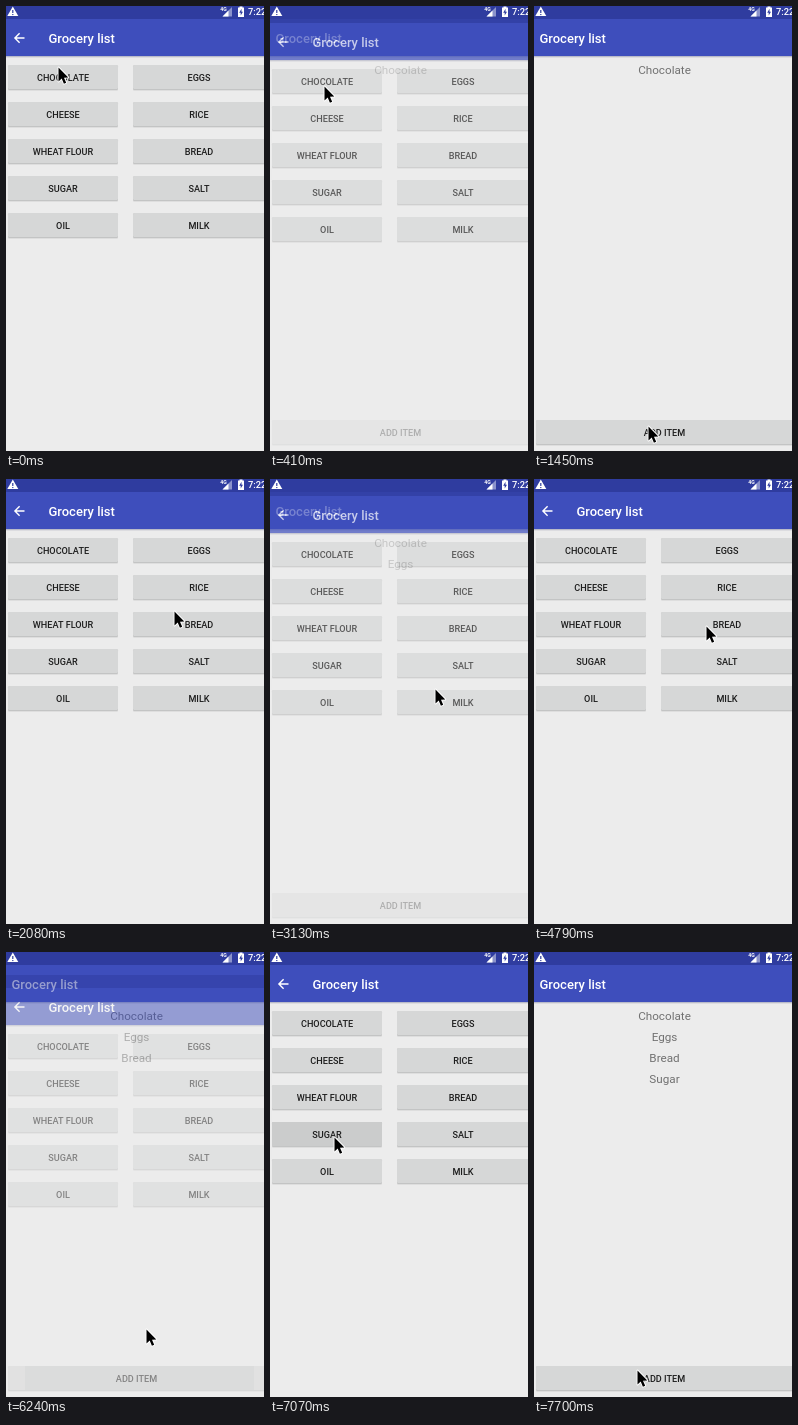
An HTML page with a canvas for the animation above (8 s loop, 258x445 px).

```html
<!DOCTYPE html>
<html lang="en">
<head>
<meta charset="utf-8">
<title>Grocery list</title>
<style>
html, body { margin: 0; width: 258px; height: 445px; overflow: hidden; background: #ececec; }
canvas { display: block; }
</style>
</head>
<body>
<canvas id="stage" width="258" height="445"></canvas>
<script>
const W = 258, H = 445, LOOP = 8000, TICK = 208.3;
const stage = document.getElementById('stage').getContext('2d');
const layer = document.createElement('canvas');
layer.width = W;
layer.height = H;
const layerCtx = layer.getContext('2d');

const goods = [
  ['CHOCOLATE', 'EGGS'], ['CHEESE', 'RICE'], ['WHEAT FLOUR', 'BREAD'],
  ['SUGAR', 'SALT'], ['OIL', 'MILK']
];
const bought = ['Chocolate', 'Eggs', 'Bread', 'Sugar'];

// Each scene starts at a tick and lasts until the next one.
const scenes = [
  { at: 0, pick: 1 },
  { at: 1, pick: 1, press: 'CHOCOLATE' },
  { at: 2, items: 1, pick: 0.7, shift: 4 },
  { at: 3, items: 1 },
  { at: 9, items: 1, pick: 0.5, shift: 23, ripple: [19, 248] },
  { at: 10, pick: 1 },
  { at: 15, items: 2, pick: 0.7, shift: 4 },
  { at: 16, items: 2 },
  { at: 19, items: 2, ripple: [21, 239] },
  { at: 20, pick: 1 },
  { at: 25, pick: 1, press: 'BREAD' },
  { at: 26, items: 3 },
  { at: 30, items: 3, pick: 0.5, shift: 23, ripple: [19, 248] },
  { at: 31, pick: 1 },
  { at: 34, pick: 1, press: 'SUGAR' },
  { at: 35, items: 4 }
];

// Pointer waypoints: tick, x, y
const path = [
  [0, 52, 61], [2, 54, 80], [6, 113, 428], [7, 114, 420], [8, 114, 420],
  [9, 138, 340], [10, 168, 132], [13, 182, 63], [14, 182, 63], [15, 165, 210],
  [16, 128, 425], [18, 128, 425], [19, 140, 345], [20, 165, 200],
  [23, 172, 147], [24, 172, 147], [25, 168, 190], [27, 130, 420],
  [29, 128, 421], [30, 140, 377], [31, 95, 240], [32, 62, 176],
  [33, 62, 176], [34, 64, 185], [35, 78, 270], [37, 103, 418], [39, 103, 418]
];

function text(c, str, x, y, size, weight, color, align = 'left') {
  c.font = `${weight} ${size}px Roboto, sans-serif`;
  c.textAlign = align;
  c.fillStyle = color;
  c.fillText(str, x, y);
}

function rect(c, x, y, w, h, color) {
  c.fillStyle = color;
  c.fillRect(x, y, w, h);
}

function poly(c, points, color) {
  c.beginPath();
  points.forEach(([x, y]) => c.lineTo(x, y));
  c.closePath();
  c.fillStyle = color;
  c.fill();
}

function button(c, label, x, y, w, ripple) {
  c.beginPath();
  c.roundRect(x, y + 1, w, 25, 1.5);
  c.fillStyle = '#dedede';
  c.fill();
  c.beginPath();
  c.roundRect(x, y, w, 25, 1.5);
  c.fillStyle = '#c3c4c4';
  c.fill();
  c.beginPath();
  c.roundRect(x, y, w, 24, 1.5);
  c.fillStyle = '#d6d7d7';
  c.fill();
  if (ripple) rect(c, ripple[0], y, ripple[1] - ripple[0], 24, '#cbcccc');
  text(c, label, x + w / 2, y + 15.7, 9.1, 500, '#1d1d1d', 'center');
}

function frame(c, titleX) {
  rect(c, 0, 0, W, H, '#ececec');
  rect(c, 0, 50, W, 1, '#b9bbc9');
  rect(c, 0, 51, W, 1, '#dcdce0');
  rect(c, 0, 13, W, 37, '#3e4ebc');
  rect(c, 0, 0, W, 13, '#2f3c9f');
  text(c, 'Grocery list', titleX, 37, 13, 500, '#fff');
}

function drawList(c, scene) {
  frame(c, 5.5);
  bought.slice(0, scene.items).forEach((name, i) =>
    text(c, name, 130.5, 68 + 21 * i, 11.7, 400, '#717171', 'center'));
  button(c, 'ADD ITEM', 2, 414, 257, scene.ripple);
}

function drawPicker(c, scene) {
  frame(c, 42.5);
  c.strokeStyle = '#fff';
  c.lineWidth = 1.4;
  c.beginPath();
  c.moveTo(18.5, 32);
  c.lineTo(9.2, 32);
  c.moveTo(13.6, 27.3);
  c.lineTo(8.9, 32);
  c.lineTo(13.6, 36.7);
  c.stroke();
  goods.forEach((row, r) => row.forEach((name, col) => {
    const x = col ? 127 : 2, w = col ? 132 : 110;
    button(c, name, x, 59 + 37 * r, w, scene.press === name && [x, x + w]);
  }));
}

function drawStatus(c) {
  poly(c, [[6.8, 0.5], [12.3, 10], [1.3, 10]], '#fff');
  rect(c, 6.2, 4, 1.2, 3, '#2f3c9f');
  rect(c, 6.2, 8, 1.2, 1.1, '#2f3c9f');
  text(c, '4G', 214.3, 5, 5.2, 700, '#fff');
  poly(c, [[226, 1], [226, 10.5], [216.5, 10.5]], '#8b93cb');
  poly(c, [[222.5, 4.5], [222.5, 10.5], [216.5, 10.5]], '#fff');
  rect(c, 233.5, 0.5, 3, 1.5, '#fff');
  rect(c, 232, 1.5, 6, 9.5, '#fff');
  poly(c, [[235.5, 2.8], [233.2, 6.7], [234.7, 6.7], [234.7, 9.6], [237, 5.7], [235.5, 5.7]], '#2f3c9f');
  text(c, '7:22', 242, 9, 9.3, 500, '#fff');
}

function drawPointer(c, x, y) {
  c.save();
  c.translate(x + 0.5, y + 0.5);
  c.beginPath();
  [[0, 0], [0, 14], [3.2, 11], [5.4, 16.2], [7.7, 15.2], [5.5, 10.2], [9.8, 10]]
    .forEach(([px, py]) => c.lineTo(px, py));
  c.closePath();
  c.lineWidth = 1.8;
  c.lineJoin = 'round';
  c.strokeStyle = '#fff';
  c.stroke();
  c.fillStyle = '#000';
  c.fill();
  c.restore();
}

function pointerAt(tick) {
  const i = Math.max(1, path.findIndex(p => p[0] >= tick));
  const [t0, x0, y0] = path[i - 1], [t1, x1, y1] = path[i];
  const k = (tick - t0) / (t1 - t0);
  return [Math.round(x0 + (x1 - x0) * k), Math.round(y0 + (y1 - y0) * k)];
}

function render(ms) {
  // The screen refreshes in steps, so all motion is sampled per tick.
  const tick = Math.min(37, Math.floor((ms + 13) / TICK));
  const scene = scenes.filter(s => s.at <= tick).pop();
  if (scene.items) drawList(stage, scene);
  if (scene.pick) {
    drawPicker(layerCtx, scene);
    stage.globalAlpha = scene.pick;
    stage.drawImage(layer, 0, scene.shift || 0);
    stage.globalAlpha = 1;
  }
  drawStatus(stage);
  drawPointer(stage, ...pointerAt(tick));
}

const start = performance.now();
function loop() {
  render((performance.now() - start) % LOOP);
  requestAnimationFrame(loop);
}
loop();
</script>
</body>
</html>
```
